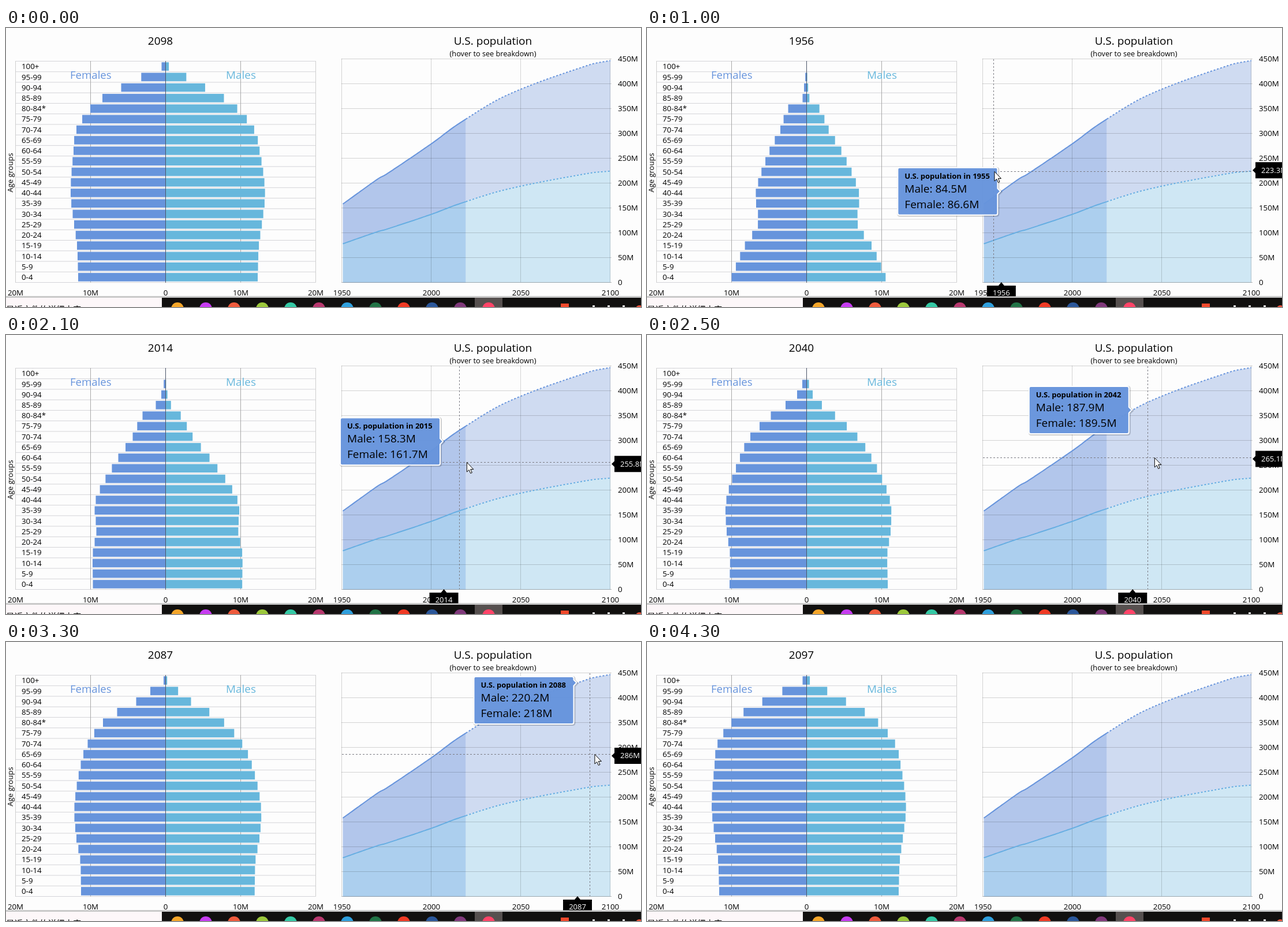
An HTML page that plays this animation: 1100 px wide and 483 px high, repeating every 4.4 s.

```html
<!DOCTYPE html>
<html lang="en">
<head>
<meta charset="utf-8">
<title>Population pyramid</title>
<style>
html, body { margin: 0; width: 100%; height: 100%; overflow: hidden; background: #fdfdfd; }
svg { display: block; width: 100%; height: 100%; font: 13.3px "Open Sans", "Noto Sans", sans-serif; }
</style>
</head>
<body>
<svg id="stage" viewBox="0 0 1100 483"></svg>
<script>
const LOOP = 4400, STEP = 100;
const BLUE = '#6794dc', CYAN = '#67b7dc';
const stage = document.getElementById('stage');

function set(el, attrs) {
  for (const k in attrs) el.setAttribute(k, attrs[k]);
}
function add(tag, attrs = {}, parent = stage, text) {
  const el = document.createElementNS('http://www.w3.org/2000/svg', tag);
  set(el, attrs);
  if (text !== undefined) el.textContent = text;
  parent.appendChild(el);
  return el;
}
const line = (x1, y1, x2, y2, stroke, parent, more) =>
  add('line', { x1, y1, x2, y2, stroke, ...more }, parent);
const label = (x, y, text, more, parent) => add('text', { x, y, ...more }, parent, text);
const mid = { 'text-anchor': 'middle' };

// Smooth curve through the points (xs, vs), constant outside
function spline(xs, vs) {
  const n = xs.length - 1;
  const slope = i => {
    const a = Math.max(0, i - 1), b = Math.min(n, i + 1);
    return (vs[b] - vs[a]) / (xs[b] - xs[a]);
  };
  return x => {
    if (x <= xs[0]) return vs[0];
    if (x >= xs[n]) return vs[n];
    let i = 0;
    while (x > xs[i + 1]) i++;
    const h = xs[i + 1] - xs[i], u = (x - xs[i]) / h, w = 1 - u;
    return w * w * (1 + 2 * u) * vs[i] + u * u * (3 - 2 * u) * vs[i + 1] +
      h * u * w * (w * slope(i) - u * slope(i + 1));
  };
}
// One curve per column, the first column being the argument
function curves(rows) {
  const col = i => rows.map(r => r[i]);
  return [spline(col(0), col(1)), spline(col(0), col(2))];
}

// Year, male and total population in millions
const [male, total] = curves([
  [1950, 78.2, 158.2], [1970, 103.2, 209.6], [1974, 106.9, 217.3], [2000, 138, 280.5],
  [2015, 158.3, 320], [2042, 187.9, 377.4], [2088, 220.2, 438.2], [2100, 224.5, 447]
]);
const xOf = year => 583.5 + (year - 1950) * 3.09;
const yearAt = x => 1950 + (x - 583.5) / 3.09;
const yOf = v => 440.8 - v * 0.86;
const short = v => +v.toFixed(1) + 'M';

// Hover position: time, x, y
const [hoverX, hoverY] = curves([
  [100, 1041, 190], [475, 711, 232], [575, 662, 238], [600, 658, 239], [700, 643, 242], [1000, 600, 248],
  [1275, 626, 243], [1400, 644, 239], [2100, 785, 220], [2500, 867, 212], [3300, 1011, 194], [3600, 1038, 188]
]);
const LAG = 130;

// Female bars follow a curve over the rows; men are 5% more at birth and fewer with age
const ROWS = 21, KNOTS = [0, 2, 3, 4, 6, 8, 12, 15, 17, 20];
function pyramid(loss, ...widths) {
  const female = spline(KNOTS, widths);
  return Array.from({ length: ROWS }, (_, r) => {
    const f = female(r);
    return [f, f * Math.max(0, 1.053 - loss * (1 - r / 20) ** 4)];
  });
}
const late = pyramid(0.25, 7, 77, 109.5, 130.5, 154.5, 159.5, 164.5, 158.5, 153.5, 151.5);
const falling = pyramid(0.63, 2.5, 32, 49.5, 79.5, 97.5, 114.5, 128, 143.5, 138, 129.5);
const early = pyramid(0.97, 0, 1, 1.7, 26, 39, 58, 83, 77, 103, 130);
const present = pyramid(0.97, 0, 7.5, 17, 40, 57, 82, 121, 120, 126, 126);
const rising = pyramid(0.63, 0.5, 16.5, 36.5, 62, 97.5, 115.5, 139, 138.5, 133, 133.5);
const nearEnd = pyramid(0.29, 3.5, 51, 84, 108.5, 135, 147, 158, 154.5, 148, 146.5);

const easeIn = u => u * u, easeOut = u => u * (2 - u), even = u => u;
const POSES = [
  [0, late], [600, falling, easeIn], [1200, early, easeOut], [1400, early, even],
  [2100, present, even], [2500, rising, even], [3300, nearEnd, easeOut], [LOOP, late, easeOut]
];

// Left chart
const ROW = 383 / ROWS, AXIS = 276.5;
for (let i = 0; i <= ROWS; i++) line(16, 57.5 + i * ROW, 536.5, 57.5 + i * ROW, '#d4d4d8');
[16.5, 146.5, 406.5, 536.5].forEach((x, i) =>
  line(x, 57, x, 440.5, i % 3 ? '#a9a9a9' : '#cfcfcf'));
const bars = late.map((_, i) => {
  const y = 57.5 + i * ROW + 1.8, height = 14.6, low = 100 - i * 5;
  label(27, y + 12, i ? low + '-' + (low + 4) + (low === 80 ? '*' : '') : '100+');
  return [
    add('rect', { y, height, fill: BLUE }),
    add('rect', { x: AXIS, y, height, fill: CYAN })
  ];
});
line(AXIS, 57, AXIS, 441, '#4a5568');
for (let i = -2; i <= 2; i++) label(AXIS + i * 130, 463, i ? Math.abs(i) * 10 + 'M' : 0, mid);
label(111, 88, 'Females', { fill: BLUE, 'font-size': 18.6 });
label(381, 88, 'Males', { fill: CYAN, 'font-size': 18.9 });
label(0, 0, 'Age groups', { ...mid, 'font-size': 13, transform: 'translate(12 250.5) rotate(-90)' });
const title = label(267.5, 29, '', { ...mid, 'font-size': 19 });

// Right chart
label(843.5, 29, 'U.S. population', { ...mid, 'font-size': 19 });
label(843.5, 49, '(hover to see breakdown)', { ...mid, 'font-size': 12.7 });
const START = 1950, SPLIT = 2019, END = 2100;
function points(fn, from, to) {
  const out = [];
  for (let y = from; y <= to; y++) out.push(xOf(y).toFixed(1) + ' ' + yOf(fn(y)).toFixed(1));
  return out;
}
function area(top, base, from, to, fill) {
  const edge = points(top, from, to).concat(points(base, from, to).reverse());
  add('path', { d: 'M' + edge.join('L') + 'Z', fill });
}
function curve(fn, from, to, stroke, more) {
  add('path', { d: 'M' + points(fn, from, to).join('L'), fill: 'none', stroke, 'stroke-width': 2, ...more });
}
const zero = () => 0, dash = { 'stroke-dasharray': '3 3' };
area(total, male, START, SPLIT, '#b2c6eb');
area(male, zero, START, SPLIT, '#accfee');
area(total, male, SPLIT, END, '#cfdbf1');
area(male, zero, SPLIT, END, '#cfe7f4');
for (let v = 0; v <= 450; v += 50) {
  const y = Math.round(440 - v * 0.86) + 0.5;
  line(581, y, 1049, y, '#000', stage, { opacity: v ? 0.16 : 0.28 });
  label(1060, y + 4.5, v ? v + 'M' : '0');
}
for (let i = 0; i < 4; i++) {
  const x = 581.5 + i * 155;
  line(x, 53, x, 440, '#000', stage, { opacity: 0.16 });
  label(x + 0.5, 463, START + i * 50, mid);
}
for (const [fn, stroke] of [[total, BLUE], [male, '#67aee2']]) {
  curve(fn, START, SPLIT, stroke);
  curve(fn, SPLIT, END, stroke, dash);
}

// Bottom bar
add('rect', { y: 464, width: 1100, height: 3, fill: '#c9c9c9' });
add('rect', { y: 467, width: 270, height: 16, fill: '#fdf7f9' });
add('rect', { x: 270, y: 467, width: 830, height: 16, fill: '#11100f' });
label(0, 493, '最近文件的详细内容', { 'font-size': 14.5, 'font-family': '"Noto Sans CJK SC", "Noto Sans CJK", sans-serif' });
add('rect', { x: 812, y: 467, width: 48, height: 16, fill: '#56504f' });
['#f4a62a', '#c63cf0', '#ee5a3c', '#9cc83c', '#35c9a5', '#b8386e',
  '#2f9fdd', '#217346', '#f03a24', '#2b579a', '#80397b', '#ff4468'].forEach((fill, i) =>
  add('circle', { cx: 297 + i * 49, cy: 486, r: 11, fill }));
add('rect', { x: 961, y: 477, width: 14, height: 14, fill: '#f2492c' });
for (let x = 1016; x < 1070; x += 26) add('rect', { x, y: 480, width: 4, height: 3, fill: '#ddd' });
add('circle', { cx: 1097, cy: 486, r: 6, fill: '#e8523a' });

// Hover layer
const hover = add('g');
const vLine = line(0, 54, 0, 440, '#7b7b83', hover, dash);
const hLine = line(582, 0, 1048, 0, '#7b7b83', hover, dash);
const white = { fill: '#fff', 'font-size': 13 };
const xTag = add('g', {}, hover);
add('path', { d: 'M0 440L5 446H25V464.5H-25V446H-5Z' }, xTag);
const xText = label(0, 463, '', { ...mid, ...white }, xTag);
const yTag = add('g', {}, hover);
add('path', { d: 'M1049 0L1054 -5V-14H1102V14H1054V5Z' }, yTag);
const yText = label(1064, 4.5, '', white, yTag);

const tip = add('g', {}, hover);
const shadow = add('path', { fill: 'none', stroke: '#000', 'stroke-width': 4, opacity: 0.18, transform: 'translate(1 1)' }, tip);
const bubble = add('path', { fill: BLUE, 'fill-opacity': 0.97, stroke: '#fff', 'stroke-width': 2, 'stroke-linejoin': 'round' }, tip);
const tipHead = label(12, 19, '', { 'font-size': 13, 'font-weight': 700 }, tip);
const tipMale = label(12, 43, '', { 'font-size': 19 }, tip);
const tipFemale = label(12, 70, '', { 'font-size': 19 }, tip);
const pointer = add('path', {
  d: 'M0 0V16.5L3.8 13L6.4 19L9 17.8L6.4 12H11.5Z', fill: '#fff', stroke: '#000'
}, hover);

function drawBars(t) {
  let i = 1;
  while (t > POSES[i][0]) i++;
  const [t0, a] = POSES[i - 1], [t1, b, ease] = POSES[i];
  const u = ease((t - t0) / (t1 - t0));
  bars.forEach(([f, m], r) => {
    const [wf, wm] = a[r].map((v, k) => v + (b[r][k] - v) * u);
    set(f, { x: AXIS - wf, width: wf });
    set(m, { width: wm });
  });
}

function drawTip(x, year) {
  const y = yOf(total(yearAt(x))), top = Math.max(60, y - 41), p = Math.max(10, y - top);
  const d = `M3 0H170Q173 0 173 3V${p - 5}L178 ${p}L173 ${p + 5}V79Q173 82 170 82H3Q0 82 0 79V3Q0 0 3 0Z`;
  set(tip, { transform: `translate(${x - 179.5} ${top})` });
  set(bubble, { d });
  set(shadow, { d });
  tipHead.textContent = 'U.S. population in ' + year;
  tipMale.textContent = 'Male: ' + short(male(year));
  tipFemale.textContent = 'Female: ' + short(total(year) - male(year));
}

function render(t) {
  drawBars(t);
  const shown = Math.round(yearAt(hoverX(t - 25)));
  title.textContent = shown;
  const on = t >= 100 && t < 3900;
  set(hover, { visibility: on ? 'visible' : 'hidden' });
  if (!on) return;
  const x = hoverX(t), y = hoverY(t), lagX = hoverX(t - LAG);
  set(vLine, { x1: x + 0.5, x2: x + 0.5 });
  set(hLine, { y1: y + 0.5, y2: y + 0.5 });
  set(xTag, { transform: `translate(${lagX} 0)` });
  set(yTag, { transform: `translate(0 ${hoverY(t - LAG)})` });
  xText.textContent = shown;
  yText.textContent = short((440 - y) / 0.86);
  drawTip(lagX, Math.round(yearAt(x)));
  set(pointer, { transform: `translate(${hoverX(t + 60) + 1} ${y + 0.5})` });
}

const start = performance.now();
function tick() {
  const t = (performance.now() - start) % LOOP;
  render(Math.floor(t / STEP) * STEP);
  requestAnimationFrame(tick);
}
tick();
</script>
</body>
</html>
```
